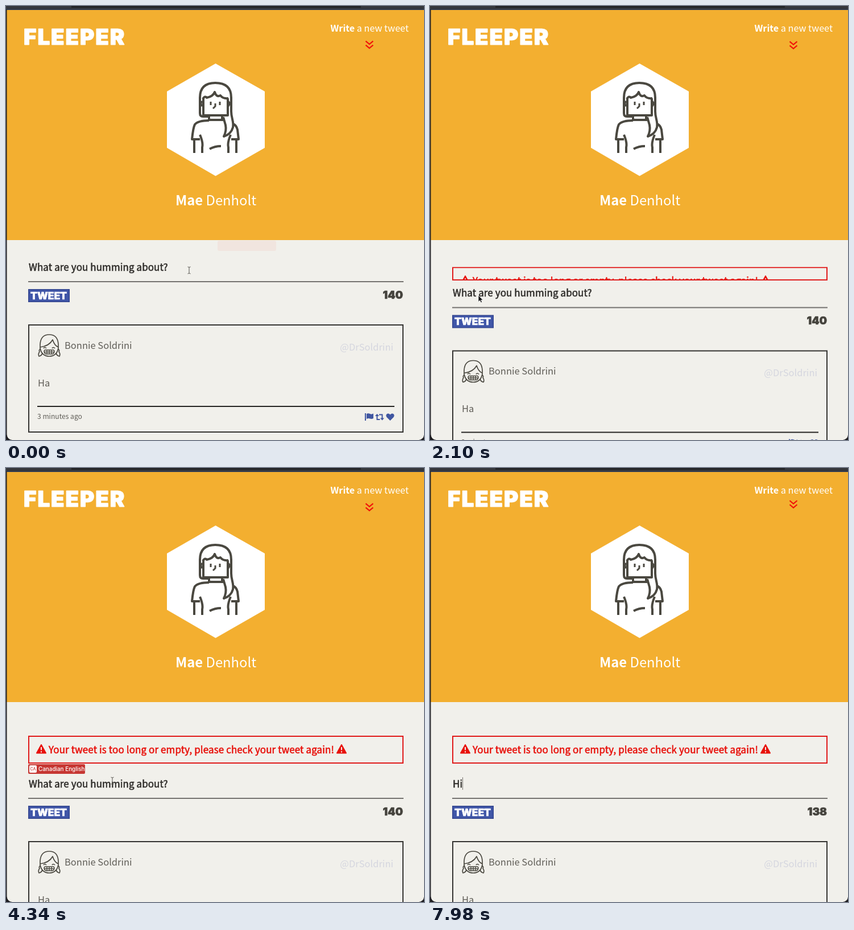
These frames come from a looping animation (735 px wide and 762 px high, 8 s). An HTML page:

```html
<!DOCTYPE html>
<html lang="en">
<head>
<meta charset="utf-8">
<title>Message page</title>
<style>
  html, body { margin: 0; width: 100%; height: 100%; overflow: hidden; background: #f1f0eb; }
  #stage { display: block; width: 735px; height: 762px; }
  text { font: 300 16.5px "Noto Sans CJK JP", "Noto Sans CJK SC", "Noto Sans CJK", "Noto Sans", sans-serif; fill: #605e58; }
  .end { text-anchor: end; }
  .bold { font-weight: 700; }
  .semi { font-size: 16.9px; font-weight: 400; fill: #302e2b; stroke: #302e2b; stroke-width: .6; letter-spacing: .14px; }
  .red { fill: #e8120c; stroke: #e8120c; }
  .white { fill: #fff; }
  .block { font-family: Inter, Roboto, sans-serif; font-weight: 900; stroke-width: .6; stroke-linejoin: bevel; }
  .logo { font-size: 38.5px; stroke: #fff; stroke-width: 1.2; letter-spacing: 1.9px; }
  .button { font-size: 17.4px; stroke: #fff; }
  .count { font-size: 19px; fill: #45433d; stroke: #45433d; }
  .line { fill: none; stroke: #4a4840; stroke-linejoin: round; }
  .tip { font-family: Inter, Roboto, sans-serif; font-weight: 500; font-size: 9.9px; fill: #fff; }
</style>
</head>
<body>
<svg id="stage" viewBox="0 0 735 762">
  <defs>
    <g id="warn">
      <path d="M9 1.5 17 16H1Z" fill="#e8120c" stroke="#e8120c" stroke-width="2" stroke-linejoin="round"/>
      <path d="M9 5.5v5.2M9 12.7v2.2" stroke="#f1f0eb" stroke-width="2"/>
    </g>
  </defs>
  <rect width="735" height="762" fill="#f1f0eb"/>

  <!-- header -->
  <rect y="6" width="735" height="405" fill="#f3af30"/>
  <text class="block white logo" x="31" y="68">FLEEPER</text>
  <text class="white end" x="708" y="45" style="font-size:16.2px"><tspan class="bold">Write</tspan> a new tweet</text>
  <path id="chevrons" d="M632.5-6.5 639-1l6.5-5.5M632.5 .5 639 6l6.5-5.5" fill="none" stroke="#f0140a" stroke-width="2.2"/>
  <path d="M368.5 101 455 150v99l-86.5 49.5L283 249v-99Z" fill="#fff"/>
  <g class="line" stroke-width="4">
    <path d="M357 194H346Q341 194 341 188V161Q341 135 368 135Q396 135 396 161V185C396 197 401 203 399 213Q396 225 383 229Q388 219 386 209L382 195"/>
    <path d="M347 161V192H390V162M346 163Q350 157 353 161Q364 159 367 151Q370 161 377 157Q381 163 391 162"/>
    <path d="M345 167q-4 4 0 9M391 167q4 4 0 9" stroke-width="3"/>
    <path d="M357 193v8M380 193v7M356 200h26"/>
    <path d="M357 201Q338 201 332 208Q329 214 327 234H341M399 207Q405 209 407 217L409 234H396"/>
    <path d="M331 235V258M405 235V258M341 226Q347 240 345 248V258M395 226Q389 240 391 248V258"/>
    <path d="M358 251Q367 246 378 246"/>
    <path d="M360 168v6M376 168v6M368 171v5l-4 4" stroke-width="3"/>
  </g>
  <text class="white" x="298" y="350" style="font-size:23.8px"><tspan class="bold">Mae</tspan> Denholt</text>
  <rect id="faded" x="372" y="412" width="103" height="18" rx="3" fill="#f1e5df"/>

  <!-- sliding alert -->
  <svg id="alert" x="38" width="662" height="50">
    <svg id="alertContent" width="660" height="47">
      <text class="semi red" x="37" y="30.5">Your tweet is too long or empty, please check your tweet again!</text>
      <use href="#warn" x="15" y="14.5"/>
      <use href="#warn" x="543" y="14.5"/>
    </svg>
    <rect id="alertBox" x="2" y="1" width="658" fill="none" stroke="#e01a1a" stroke-width="2"/>
  </svg>

  <!-- form and card -->
  <g id="page">
    <text id="input" class="semi" x="40" y="465"></text>
    <path id="caret" d="M0 447v22" stroke="#77746f"/>
    <path d="M39 484H699" stroke="#757370" stroke-width="2"/>
    <rect x="39" y="497" width="73" height="23" fill="#34468f"/>
    <rect x="40.5" y="498.5" width="70" height="20" fill="#4056a8"/>
    <text class="block white button" x="43" y="515">TWEET</text>
    <text id="counter" class="block end count" x="698" y="514"></text>

    <rect x="40" y="560" width="658" height="188" fill="none" stroke="#353432" stroke-width="2"/>
    <g class="line" stroke-width="1.7">
      <path d="M60 601V594Q61 577 76 577Q91 577 92 594V601Q89 615 76 615Q63 615 60 601Z"/>
      <path d="M60 599Q76 597 82 586Q85 596 92 599"/>
      <path d="M61 602q-4 2-2 5q-3 4-1 8q5-1 6-6M91 602q4 2 2 5q3 4 1 8q-5-1-6-6"/>
      <path d="M66 601q2-3 5 0M81 601q2-3 5 0"/>
      <path d="M69 604h14q2 0 2 3q-1 4-4 4H71q-3 0-4-4q0-3 2-3ZM67 607.5h18M72 604v7M76 604v7M80 604v7" stroke-width="1.4"/>
    </g>
    <text x="103" y="602">Bonnie Soldrini</text>
    <text class="end" x="681" y="605" style="fill:#d5d6df">@DrSoldrini</text>
    <text x="56" y="668">Ha</text>
    <path d="M55 703H683" stroke="#262523" stroke-width="2"/>
    <text x="55" y="725" style="font-size:12.1px">3 minutes ago</text>
    <g fill="#4056a1">
      <path d="M631 715h2v13h-2ZM634 716q3-1.5 6 0t6-.5v8.5q-3 1.5-6 .5t-6 .5Z"/>
      <path d="M675.5 728l-6-6q-2.5-3.5 .5-6q3-1.5 5.5 1.5q2.5-3 5.5-1.5q3 2.5 .5 6Z"/>
      <path d="M652.5 719v7h5M656 717.5h5.5v7" fill="none" stroke="#4056a1" stroke-width="2"/>
      <path d="M649 720h7l-3.5-4ZM658 723.5h7l-3.5 4Z"/>
    </g>
  </g>

  <g id="tooltip">
    <rect x="39" y="520" width="100" height="17" rx="2" fill="#c63733"/>
    <rect x="41" y="522" width="13" height="13" rx="2" fill="#fff"/>
    <text class="tip" x="42.5" y="531" style="font-size:7px;fill:#c93a36">CA</text>
    <text class="tip" x="57" y="532">Canadian English</text>
  </g>

  <g id="pointer">
    <path id="arrow" d="M0 0V11.5L2.7 9 4.6 13 6.6 12 4.8 8.3H8.2Z" fill="#111" stroke="#fff" stroke-width=".8"/>
    <path id="beam" d="M-2.5-6Q0-6 0-4.5Q0-6 2.5-6M0-4.5V4.5M-2.5 6Q0 6 0 4.5Q0 6 2.5 6" fill="none" stroke="#55534e"/>
  </g>

  <!-- window edges -->
  <rect width="735" height="7" fill="#35373c"/>
  <rect x="115" width="509" height="3" fill="#222326"/>
  <rect y="5.5" width="735" height="1.5" fill="#2f3c57"/>
  <path d="M0 6H1.5V752Q2 761 11 762H0ZM735 753Q734 761 726 762H735Z" fill="#1d1c20"/>
</svg>
<script>
const LOOP = 8000;
const BOUNCE = 2240, BOUNCE_TOP = 851;
const SLIDE_START = 1891, SLIDE_TIME = 448;
const FOCUS = 3700, BLINK = 600;
const KEY_H = 7280, KEY_I = 7560;

// time, x, y
const PATH = [
  [0, 322, 464], [400, 322, 464], [910, 290, 437], [1500, 85, 508],
  [2250, 85, 508], [2870, 293, 427], [3150, 293, 427], [3650, 187, 549],
  [5600, 187, 549], [5950, 171, 551], [LOOP, 171, 551]
];

const $ = id => document.getElementById(id);
const clamp = v => Math.min(1, Math.max(0, v));
const smooth = v => v * v * (3 - 2 * v);
const show = (id, on) => $(id).setAttribute("visibility", on ? "visible" : "hidden");
const move = (id, x, y) => $(id).setAttribute("transform", `translate(${x} ${y})`);

function pointerAt(t) {
  const next = PATH.findIndex(p => p[0] > t);
  const a = PATH[next - 1], b = PATH[next];
  const k = smooth((t - a[0]) / (b[0] - a[0]));
  return [a[1] + (b[1] - a[1]) * k, a[2] + (b[2] - a[2]) * k];
}

function drawAlert(t) {
  const open = t >= SLIDE_START;
  const s = 0.5 - Math.cos(Math.PI * clamp((t - SLIDE_START) / SLIDE_TIME)) / 2;
  const height = 3 + 46 * s;
  show("alert", open);
  $("alert").setAttribute("y", 448.4 + 21.6 * s);
  $("alertContent").setAttribute("height", height - 2);
  $("alertBox").setAttribute("height", height - 2);
  move("page", 0, open ? 4 + 92 * s : 0);
}

function drawInput(t) {
  const typed = t >= KEY_I ? "Hi" : t >= KEY_H ? "H" : "";
  $("input").textContent = typed || "What are you humming about?";
  $("counter").textContent = 140 - typed.length;
  const lit = Math.floor((t - FOCUS) / BLINK) % 2 === 0;
  show("caret", t >= FOCUS && (typed || lit));
  move("caret", [40.5, 52.5, 57.5][typed.length], 0);
  show("tooltip", t >= FOCUS && !typed);
}

function render(t) {
  const phase = ((t - BOUNCE_TOP) / BOUNCE % 1 + 1) % 1;
  move("chevrons", 0, 61.4 + 7.8 * smooth(1 - Math.abs(1 - 2 * phase)));
  show("faded", t < 280);
  drawAlert(t);
  drawInput(t);

  const visible = t < KEY_H;
  const inText = t < 700 || t > 3550;
  move("pointer", ...pointerAt(t));
  show("arrow", visible && !inText);
  show("beam", visible && inText);
}

const start = performance.now();
function tick() {
  render((performance.now() - start) % LOOP);
  requestAnimationFrame(tick);
}
tick();
</script>
</body>
</html>
```
